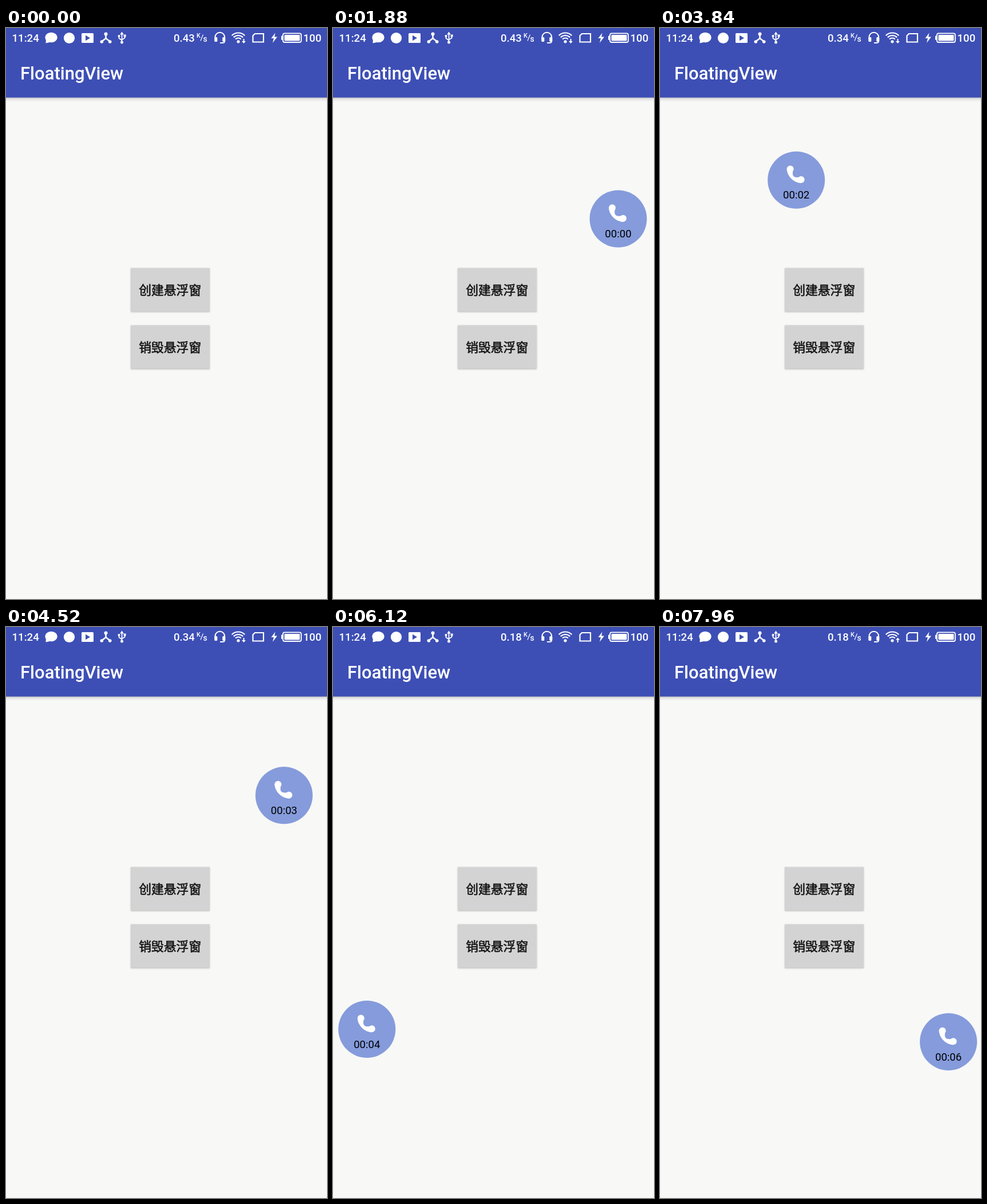
Animation of 561x998 px, one loop 8 s. Source, as an HTML page with a canvas:

```html
<!DOCTYPE html>
<html lang="zh">
<head>
<meta charset="utf-8">
<title>FloatingView</title>
<style>
html, body { margin: 0; width: 100%; height: 100%; overflow: hidden; background: #f8f8f7; }
canvas { display: block; width: 561px; height: 998px; }
</style>
</head>
<body>
<canvas id="stage" width="561" height="998"></canvas>
<script>
const ctx = document.getElementById('stage').getContext('2d');
const LOOP = 8000, STEP = 40, SNAP = 200;
const BLUE = '#3d4fb5', WHITE = '#fff';
const LEFT = 62, RIGHT = 498.5;

// Each drag bends toward `via`, lets go at `drop`, then snaps to the nearer edge.
const DRAGS = [
  { start: 2280, release: 2800, via: [-74, 412], drop: [490, 187] },
  { start: 3560, release: 4120, via: [0, 290], drop: [400, 296] },
  { start: 4480, release: 5160, via: [280, 212], drop: [160, 308] },
  { start: 5640, release: 5960, via: [350, 480], drop: [120, 703] },
  { start: 6560, release: 7120, via: [486, 749], drop: [440, 756] },
  { start: 7480, release: 7840, via: [276, 800], drop: [442, 725] }
];

const clamp = v => Math.max(0, Math.min(1, v));
const smooth = u => u * u * (3 - 2 * u);
const backOut = u => 1 + 2.7 * (u - 1) ** 3 + 1.7 * (u - 1) ** 2;
const bend = (a, b, c, u) => a * (1 - u) ** 2 + 2 * b * u * (1 - u) + c * u * u;

function ballAt(t) {
  let x = RIGHT, y = 333.5;
  for (const { start, release, via, drop } of DRAGS) {
    if (t < start) break;
    const u = clamp((t - start) / (release - start));
    x = bend(x, via[0], drop[0], u ** 1.25);
    y = bend(y, via[1], drop[1], smooth(u));
    if (t > release) {
      const edge = drop[0] < 280 ? LEFT : RIGHT;
      x += (edge - x) * backOut(clamp((t - release) / SNAP));
    }
  }
  return [x, y];
}

function text(str, x, y, font, color = WHITE, align = 'left') {
  ctx.font = font;
  ctx.textAlign = align;
  ctx.fillStyle = color;
  ctx.fillText(str, x, y);
}

function fill(d, color = WHITE) {
  ctx.fillStyle = color;
  ctx.fill(new Path2D(d));
}

function line(d, width = 2, color = WHITE) {
  ctx.strokeStyle = color;
  ctx.lineWidth = width;
  ctx.stroke(new Path2D(d));
}

function disc(x, y, rx, ry = rx, color = WHITE) {
  ctx.fillStyle = color;
  ctx.beginPath();
  ctx.ellipse(x, y, rx, ry, 0, 0, Math.PI * 2);
  ctx.fill();
}

function box(x, y, w, h, r, color = WHITE) {
  ctx.fillStyle = color;
  ctx.beginPath();
  ctx.roundRect(x, y, w, h, r);
  ctx.fill();
}

function wifi(arrow) {
  ctx.strokeStyle = WHITE;
  ctx.lineWidth = 2.2;
  for (let r = 7; r <= 16; r += 4.5) {
    ctx.beginPath();
    ctx.arc(406, 24.5, r, -Math.PI * 0.75, -Math.PI * 0.25);
    ctx.stroke();
  }
  disc(406, 23.8, 2.6);
  if (!arrow) return;
  box(411, 17.5, 9, 10, 0, BLUE);
  if (arrow === 'down') fill('M414.5 19h2v4h2.5l-3.5 4-3.5-4h2.5z');
  else fill('M415.5 18.5l3.5 4h-2.5v4.5h-2v-4.5h-2.5z');
}

function statusBar(t) {
  const font = '500 18.6px Roboto, sans-serif';
  text('11:24', 10.5, 24, font);
  disc(79, 16.5, 10.7, 8.8);
  fill('M70 19l-.5 7.5 9-2z');
  disc(110.5, 17.5, 9.6);
  box(132, 9, 21, 17, 1.5);
  fill('M139 12.8v9.4l8-4.7z', BLUE);

  line('M174.5 11v7.5M174.5 18l-7 5.5M174.5 18l7 5.5', 2.6);
  disc(174.5, 10.5, 3);
  disc(167.3, 24, 2.8);
  disc(181.7, 24, 2.8);

  line('M202.5 10v14M197.5 14v4l5 3.5M207.5 13v4.5l-5 3', 1.8);
  fill('M202.5 6.5l3.3 5h-6.6z');
  disc(202.5, 25, 2.5);
  disc(197.5, 14, 2);
  box(205.6, 11.5, 4, 4, 0);

  text(t < 2520 ? '0.43' : t < 5520 ? '0.34' : '0.18', 293, 24, font);
  text('K', 333, 17, '500 11px Roboto, sans-serif');
  line('M340 22.5l4.5-11', 1.2);
  text('s', 344.5, 24, '500 14px Roboto, sans-serif');

  line('M365.5 19v-3a8.3 8.3 0 0 1 16.6 0v7q0 3-4 3h-4');
  box(364.3, 16, 5, 8, 1.5);
  box(378.3, 16, 5, 8, 1.5);

  wifi(t < 5760 ? 'down' : t < 7520 ? '' : 'up');
  line('M435 10h15v14.5h-18.5v-11z', 2.2);
  fill('M470.5 8.5l-7 9.5h4.5l-2 8 8-10.5h-4.8z');

  ctx.lineWidth = 1.8;
  ctx.beginPath();
  ctx.roundRect(484, 9.4, 32, 15.6, 3);
  ctx.stroke();
  box(481, 13.5, 2.5, 7.5, 1);
  box(486.5, 12, 27, 10.5, 1);
  text('100', 519.5, 24, font);
}

function header(t) {
  const shade = ctx.createLinearGradient(0, 121, 0, 129);
  shade.addColorStop(0, 'rgba(0,0,0,.27)');
  shade.addColorStop(0.35, 'rgba(0,0,0,.09)');
  shade.addColorStop(1, 'rgba(0,0,0,0)');
  box(0, 121, 561, 8, 0, shade);
  box(0, 0, 561, 121.5, 0, BLUE);
  statusBar(t);
  text('FloatingView', 25, 90, '500 31px Roboto, sans-serif');
}

function button(y, label, press = 0, spread = 0) {
  ctx.save();
  ctx.shadowColor = 'rgba(0,0,0,.25)';
  ctx.shadowBlur = 2.5 + press * 6;
  ctx.shadowOffsetY = 1 + press * 2;
  box(218, y, 138, 76, 0.5, '#d3d3d3');
  ctx.restore();
  if (press > 0) {
    ctx.save();
    ctx.beginPath();
    ctx.rect(218, y, 138, 76);
    ctx.clip();
    box(218, y, 138, 76, 0, `rgba(0,0,0,${0.05 * press})`);
    disc(287, y + 38, 80 * spread, 80 * spread, `rgba(0,0,0,${0.1 * press})`);
    ctx.restore();
  }
  const ink = '#151515';
  text(label, 286.7, y + 46.3, '500 21.8px "Noto Sans CJK SC", "Noto Sans CJK", sans-serif', ink, 'center');
  // A thin outline brings the label to medium weight.
  ctx.strokeStyle = ink;
  ctx.lineWidth = 0.6;
  ctx.strokeText(label, 286.7, y + 46.3);
}

function ball(t) {
  const seconds = Math.floor((t - 1320) / 1000);
  ctx.save();
  ctx.globalAlpha = clamp((t - 1280) / 160);
  ctx.translate(...ballAt(t));
  disc(0, 0, 50, 50, 'rgba(80,112,206,.68)');
  disc(-10.5, -19.3, 6);
  disc(8.5, -0.7, 6);
  fill('M-16.5-20C-16.5-7-4 5.4 9 5.3L4.5-5Q-8.2-3-6-15z');
  text('00:0' + seconds, 0, 32.5, '400 18.6px Roboto, sans-serif', '#000', 'center');
  ctx.restore();
}

function draw(t) {
  box(0, 0, 561, 998, 0, '#f8f8f7');
  header(t);
  const press = clamp((t - 1120) / 120) * clamp((1880 - t) / 480);
  button(419.5, '创建悬浮窗', press, clamp((t - 1120) / 360));
  button(519.5, '销毁悬浮窗');
  if (t >= 1320) ball(t);
}

function frame() {
  const t = performance.now() % LOOP;
  draw(Math.floor(t / STEP) * STEP);
  requestAnimationFrame(frame);
}
frame();
</script>
</body>
</html>
```
